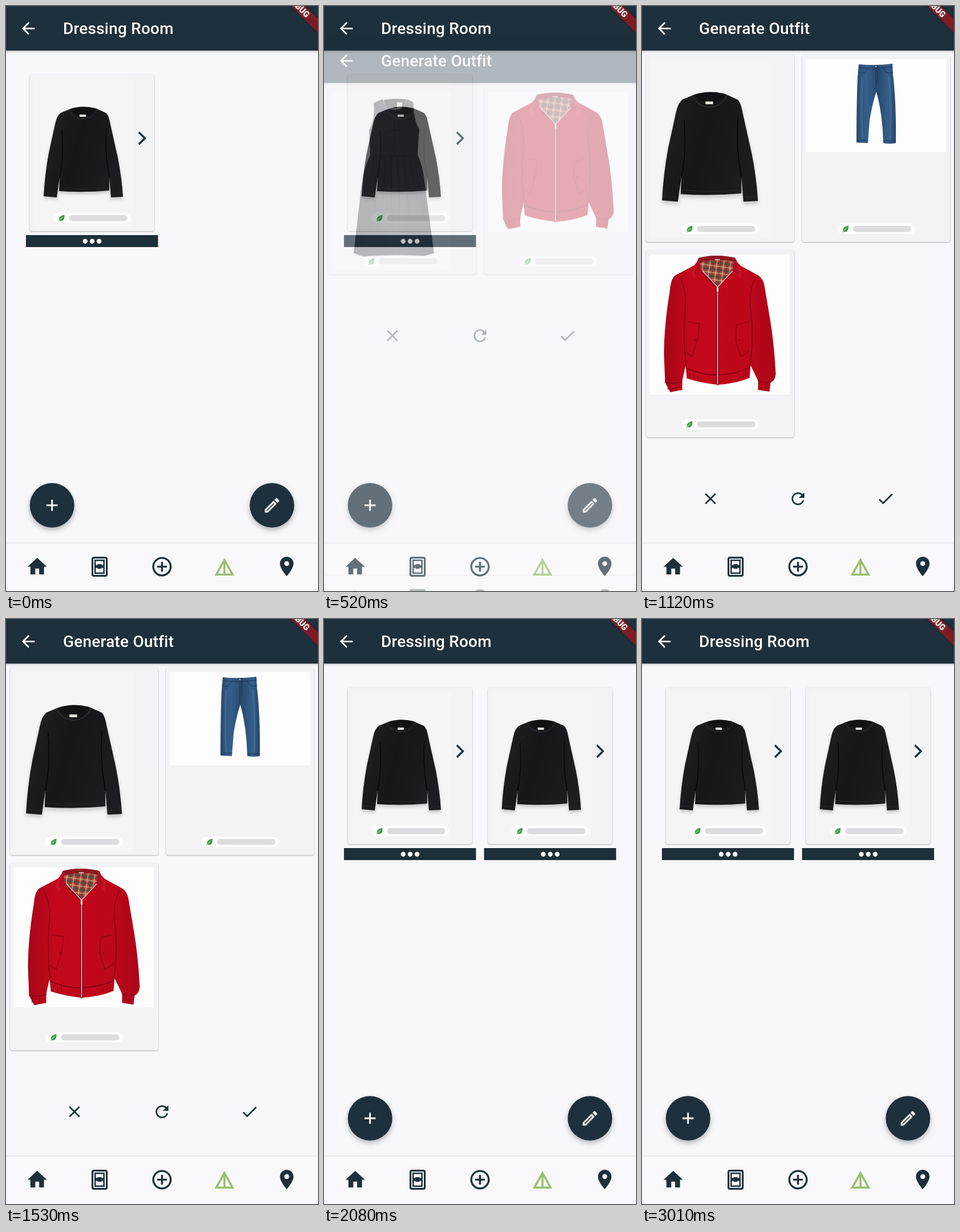
Recreate the animation shown at these times as an HTML page. Size 547x1024 px, loop 3.03 s.

```html
<!DOCTYPE html>
<html lang="en">
<head>
<meta charset="utf-8">
<title>Dressing Room</title>
<style>
html, body { margin: 0; width: 100%; height: 100%; overflow: hidden; background: #f8f8fc; }
svg.stage { display: block; width: 100vw; height: 100vh; }
text { font-family: Roboto, sans-serif; }
.title { font-size: 28px; font-weight: 500; letter-spacing: .2px; fill: #fff; }
.ink { fill: #1d303a; }
.card { fill: #f3f3f5; filter: drop-shadow(0 1px 1.2px rgba(0,0,0,.3)); }
.photo { fill: #fdfdfd; }
.fab { fill: #1e303b; filter: drop-shadow(0 4px 5px rgba(20,30,40,.33)); }
.bar { fill: #1e303b; filter: drop-shadow(0 1.5px 2px rgba(0,0,0,.3)); }
.line { fill: none; stroke-linecap: round; stroke-linejoin: round; }

.page, .fade, .before, .after, .added, .ripple { animation: 3030ms linear infinite both; }
.page { animation-name: rise; }
.fade { animation-name: fade; }
.before, .after, .added { animation-timing-function: step-end; }
.before { animation-name: before; }
.after { animation-name: after; }
.added { animation-name: added; }
.ripple { transform-box: fill-box; transform-origin: center; }
.edit { animation-name: edit; }
.redo { animation-name: redo; }
.accept { animation-name: accept; }

/* Page pushed in from below, later popped with the curves mirrored */
@keyframes rise {
  0%, 15.18% { transform: translateY(265px); animation-timing-function: cubic-bezier(.4,0,.2,1); }
  19.14%, 63.7% { transform: translateY(0); animation-timing-function: cubic-bezier(.8,0,.6,1); }
  67.66%, 100% { transform: translateY(265px); }
}
@keyframes fade {
  0%, 15.18% { opacity: 0; animation-timing-function: cubic-bezier(.42,0,1,1); }
  19.14%, 63.7% { opacity: 1; animation-timing-function: cubic-bezier(0,0,.58,1); }
  67.66%, 100% { opacity: 0; }
}
@keyframes before { 0% { opacity: 1; } 33%, 100% { opacity: 0; } }
@keyframes after { 0% { opacity: 0; } 33%, 100% { opacity: 1; } }
@keyframes added { 0% { opacity: 0; } 60%, 100% { opacity: 1; } }
@keyframes edit {
  0%, 13.2% { opacity: 0; transform: scale(.3); }
  13.8% { opacity: .1; }
  15.5%, 17.5% { opacity: .1; transform: scale(1); }
  19.2%, 100% { opacity: 0; transform: scale(1); }
}
@keyframes redo {
  0%, 29.6% { opacity: 0; transform: scale(.3); }
  30% { opacity: .065; }
  31.6% { opacity: .065; transform: scale(1); }
  33%, 100% { opacity: 0; transform: scale(1); }
}
@keyframes accept {
  0%, 60% { opacity: 0; transform: scale(.3); }
  60.5% { opacity: .065; }
  62%, 63% { opacity: .065; transform: scale(1); }
  65%, 100% { opacity: 0; transform: scale(1); }
}
</style>
</head>
<body>
<svg class="stage" viewBox="0 0 547 1024" preserveAspectRatio="none">
<defs>
  <linearGradient id="knit" x1="0" x2="1" y1="0" y2=".3">
    <stop offset="0" stop-color="#222224"/><stop offset=".5" stop-color="#161618"/><stop offset="1" stop-color="#1d1d1f"/>
  </linearGradient>
  <linearGradient id="denim" x1="0" x2="1">
    <stop offset="0" stop-color="#294a70"/><stop offset=".25" stop-color="#355f8c"/>
    <stop offset=".55" stop-color="#284a6f"/><stop offset=".8" stop-color="#345e8a"/><stop offset="1" stop-color="#28486c"/>
  </linearGradient>
  <linearGradient id="red" x1="0" x2="1">
    <stop offset="0" stop-color="#a80618"/><stop offset=".25" stop-color="#c4081c"/>
    <stop offset=".75" stop-color="#bd071b"/><stop offset="1" stop-color="#ab0618"/>
  </linearGradient>
  <linearGradient id="cloth" x1="0" x2="1">
    <stop offset="0" stop-color="#2b2c36"/><stop offset=".5" stop-color="#363742"/><stop offset="1" stop-color="#2a2b34"/>
  </linearGradient>
  <pattern id="tartan" width="12" height="12" patternUnits="userSpaceOnUse" patternTransform="rotate(8)">
    <path fill="#b4453c" d="M0 0h12v12H0z"/>
    <path fill="#2f4238" opacity=".6" d="M0 0h4v12H0zM0 0h12v4H0z"/>
    <path stroke="#e8d9a0" stroke-width=".9" d="M8 0v12M0 8h12"/>
  </pattern>
  <filter id="soft" x="-20%" y="-20%" width="140%" height="140%"><feGaussianBlur stdDeviation="2.5"/></filter>

  <path id="sweaterShape" d="M113 180Q134 191 157 179L175 187Q180 190 183 207L196 265Q203 300 205 334L184 335L181 300V323Q138 327 93 324L94 300L89 335L66 333Q68 295 75 257L86 207Q89 192 96 187Z"/>
  <g id="sweater">
    <use href="#sweaterShape" y="4" fill="#777" opacity=".35" filter="url(#soft)"/>
    <use href="#sweaterShape" fill="url(#knit)"/>
    <path d="M113 180Q134 173 157 179Q153 191 135 191Q118 191 113 180" fill="#111113"/>
    <path d="M110 182Q118 198 136 198Q153 197 160 181" class="line" stroke="#34343a"/>
    <path d="M129 190h11v4h-11z" fill="#e6e4de"/>
    <path d="M98 217Q102 262 94 300M176 214Q173 260 181 300" class="line" stroke="#060607" stroke-width="1.3"/>
    <path d="M94 318Q138 322 181 318M67 327l22 2M184 329l20-1" class="line" stroke="#2c2c30" stroke-width=".8"/>
  </g>

  <g id="dress">
    <path d="M104 108Q123 104 144 107L141 122H108Z" fill="#22232b"/>
    <path d="M128 112h9v10h-9z" fill="#e9e6da"/>
    <path fill="url(#cloth)" d="M103 106Q106 124 124 125Q142 124 145 106L157 112Q157 142 167 159L164 204Q173 222 176 249L193 376Q182 379 176 381Q120 378 69 382L52 376L66 256Q71 223 81 205L79 160Q90 142 87 113Z"/>
    <path d="M103 107Q106 125 124 126Q142 125 145 107M88 114Q90 143 80 159M156 113Q157 142 166 159" class="line" stroke="#b9b9c0" stroke-dasharray="1 3"/>
    <path d="M54 377Q62 381 70 382Q124 378 176 381L192 377" class="line" stroke="#b0b0b8" stroke-dasharray="2 3"/>
    <path d="M81 205Q122 208 164 204M105 165Q122 156 141 163M123 127V202M63 359Q122 366 185 359" class="line" stroke="#23242c"/>
    <path d="M88 207L73 290M97 207L88 310M107 208L104 280M117 208L119 330M128 208L133 290M139 207L151 320M149 207L165 290M158 206L176 310" class="line" stroke="#24252e" stroke-width="1.2"/>
  </g>

  <g id="jacket">
    <path d="M373 99Q404 91 437 99L432 124L407 149L376 121Z" fill="url(#tartan)"/>
    <path d="M373 99Q404 91 437 99L435 106Q405 99 375 107Z" fill="#8e1420"/>
    <path d="M401 102h9" stroke="#ddd" stroke-width="1.5"/>
    <path fill="url(#red)" d="M372 103L365 112L331 130Q324 136 322 158Q312 220 312 268L314 317L323 334L344 330V314L350 287L352 310Q378 318 406 321Q438 319 462 309L464 287L477 314V330L497 333L499 317Q507 314 508 302Q505 245 497 200L488 147Q486 136 478 130L447 113L437 103L432 121L407 148L377 121Z"/>
    <path fill="#c9102a" d="M373 99L377 119L364 138L360 126ZM437 99L432 118L447 136L448 121Z"/>
    <path fill="#b00c20" d="M373 99L365 128L380 127L405 148L376 118ZM437 99L445 128L430 125L408 148L433 118Z"/>
    <path d="M350 180Q345 240 351 292Q378 304 406 304Q438 302 462 291Q471 240 463 180M314 316q14 5 30-1M477 314q11 5 22 2" class="line" stroke="#7a0413" stroke-width="1.4"/>
    <path d="M355 211L374 214L371 241L361 272L350 264M458 211L439 216L438 244L447 272L461 262M340 133Q353 160 349 190M472 133Q460 160 464 190" class="line" stroke="#850516" stroke-width="1.2"/>
    <path d="M357 298v12M364 301v11M371 303v11M443 303v11M450 301v11M456 298v12M319 321v9M326 321v11M333 320v11M483 318v12M490 319v12" stroke="#8c0617" stroke-width="1"/>
    <path d="M385 130L406 150V320" class="line" stroke="#7c0716" stroke-width="4"/>
    <path d="M380 122L406 150V320M432 122L406 150" class="line" stroke="#d9c9c9" stroke-width="1.5"/>
    <path d="M406 149v9" stroke="#f1efef" stroke-width="3"/>
    <circle cx="368" cy="243" r="1.6" fill="#7c0716"/><circle cx="444" cy="243" r="1.6" fill="#7c0716"/>
  </g>

  <g id="jeans">
    <path fill="url(#denim)" d="M380 102Q409 105 439 101L440 120Q446 170 445 240Q434 242 423 240Q422 190 411 150Q405 165 399 200L396 240L376 239Q376 170 378 125Z"/>
    <path d="M380 108Q409 111 439 107M410 105V150M379 116Q390 122 396 109M440 116Q428 121 423 109M413 109v22l-3 5M377 235h19M424 236h21" class="line" stroke="#1c3656"/>
    <path d="M386 125Q383 180 386 233M433 125Q438 180 435 233" class="line" stroke="#5f8ab0" stroke-width="3" opacity=".35"/>
    <circle cx="410" cy="106" r="1.2" fill="#c8b48c"/>
  </g>

  <g id="rating">
    <rect width="136" height="18" rx="9" fill="#fff"/>
    <rect x="27.5" y="4" width="102" height="10.5" rx="5" fill="#dcdcde"/>
    <path d="M19.500 3.500Q20.500 14.500 13 14.500Q12 14.500 11 14L9.500 15.500L8.700 14.700L10 13Q8 6 19.500 3.500Z" fill="#43a047"/>
    <path d="M10 14.500Q12 10 16 8" class="line" stroke="#dff0df" stroke-width=".8"/>
  </g>

  <g id="tile">
    <rect class="card" x="41.500" y="119.500" width="218.500" height="274.500" rx="4.500"/>
    <path d="M48 127h175v261H48z" fill="#f5f5f6"/>
    <use href="#sweater"/>
    <path d="M233 221l10.500 10.500L233 242" fill="none" stroke="#1d303a" stroke-width="3.400"/>
    <use href="#rating" x="83" y="362"/>
    <path class="ink" d="M35 401h231.500v21H35z"/>
    <g fill="#fff"><circle cx="138.800" cy="411.800" r="4.200"/><circle cx="151" cy="411.800" r="4.200"/><circle cx="163.200" cy="411.800" r="4.200"/></g>
  </g>

  <g id="slot">
    <rect class="card" x="7" y="85" width="260" height="328" rx="4.500"/>
  </g>

  <g id="actions" class="ink">
    <path transform="translate(103.200 -16.800) scale(1.4)" d="M19 6.410L17.590 5 12 10.590 6.410 5 5 6.410 10.590 12 5 17.590 6.410 19 12 13.410 17.590 19 19 17.590 13.410 12z"/>
    <path transform="translate(256.700 -16.800) scale(1.4)" d="M17.650 6.350A7.958 7.958 0 0 0 12 4c-4.420 0-7.990 3.580-7.990 8s3.570 8 7.990 8c3.730 0 6.840-2.550 7.730-6h-2.080A5.990 5.990 0 0 1 12 18c-3.310 0-6-2.690-6-6s2.690-6 6-6c1.660 0 3.140.69 4.220 1.780L13 11h7V4z"/>
    <path transform="translate(410.200 -16.800) scale(1.4)" d="M9 16.170L4.830 12l-1.420 1.410L9 19 21 7l-1.410-1.410z"/>
  </g>

  <g id="top">
    <path class="bar" d="M-4-4h555v82H-4z"/>
    <path fill="#fff" transform="translate(22.300 22.500) scale(1.4)" d="M20 11H7.830l5.590-5.590L12 4l-8 8 8 8 1.410-1.410L7.830 13H20v-2z"/>
  </g>

  <g id="nav">
    <path d="M0 940h547v84H0z" fill="#f9f9fd"/>
    <path d="M0 940h547" stroke="#ededf1" stroke-width="2.500"/>
    <path class="ink" transform="translate(34.300 961) scale(1.7)" d="M10 20v-6h4v6h5v-8h3L12 3 2 12h3v8z"/>
    <rect x="151.600" y="965.600" width="25" height="31.800" rx="2.500" fill="none" stroke="#1d303a" stroke-width="3.200"/>
    <path class="ink" fill-rule="evenodd" d="M155 969h18v25h-18zM157.500 971.500v7h3v-1.500h7v1.500h3v-7zM157.500 983.500v8h13v-8h-3v1.500h-7v-1.500z"/>
    <path class="ink" transform="translate(253.100 961) scale(1.7)" d="M13 7h-2v4H7v2h4v4h2v-4h4v-2h-4V7zm-1-5C6.480 2 2 6.480 2 12s4.480 10 10 10 10-4.480 10-10S17.520 2 12 2zm0 18c-4.410 0-8-3.590-8-8s3.590-8 8-8 8 3.590 8 8-3.590 8-8 8z"/>
    <path d="M383 969.600L368.700 995.300H397.300ZM383 970v25" fill="none" stroke="#9abe6b" stroke-width="3.500"/>
    <path class="ink" transform="translate(471.800 960.700) scale(1.7)" d="M12 2C8.130 2 5 5.130 5 9c0 5.250 7 13 7 13s7-7.750 7-13c0-3.870-3.130-7-7-7zm0 9.500c-1.380 0-2.500-1.120-2.500-2.500s1.120-2.500 2.500-2.500 2.500 1.120 2.500 2.500-1.120 2.500-2.500 2.500z"/>
  </g>
</defs>

<!-- Dressing room -->
<path d="M0 0h547v1024H0z" fill="#f8f8fc"/>
<use href="#tile"/>
<g class="added"><use href="#tile" x="245.600"/></g>
<circle class="fab" cx="80.700" cy="874" r="39"/>
<path d="M70.900 874h19.600M80.700 864.200v19.600" stroke="#fff" stroke-width="2.800"/>
<circle class="fab" cx="466.300" cy="874" r="39"/>
<circle class="ripple edit" cx="466.300" cy="874" r="39" fill="#fff"/>
<path fill="#fff" transform="translate(449.500 857.200) scale(1.4)" d="M14.060 9.020l.92.92L5.920 19H5v-.92l9.060-9.060M17.660 3c-.25 0-.51.1-.7.29l-1.830 1.830 3.750 3.750 1.830-1.830c.39-.39.39-1.020 0-1.410l-2.340-2.340c-.2-.2-.45-.29-.71-.29zm-3.600 3.190L3 17.250V21h3.750L17.810 9.940l-3.750-3.750z"/>
<use href="#nav"/>
<use href="#top"/>
<text class="title" x="100" y="49">Dressing Room</text>

<!-- Generate outfit -->
<g class="page"><g class="fade">
  <path d="M0 0h547v1024H0z" fill="#f8f8fc"/>
  <g class="before">
    <use href="#slot"/><use href="#slot" x="273.500"/>
    <path d="M14 93h209v313H14z" fill="#f9f9fa"/>
    <use href="#dress"/><use href="#rating" x="69" y="381"/>
    <path class="photo" d="M287.500 93H533v245H287.500z"/>
    <use href="#jacket"/><use href="#rating" x="342.500" y="381"/>
    <circle class="ripple redo" cx="273.500" cy="520.500" r="48.500"/>
    <use href="#actions" y="520.500"/>
  </g>
  <g class="after">
    <use href="#slot"/><use href="#slot" x="273.500"/><use href="#slot" y="342"/>
    <path d="M14 93h209v313H14z" fill="#f5f5f6"/>
    <use href="#sweater" transform="translate(-44.800 -62.800) scale(1.21)"/>
    <use href="#rating" x="69" y="381"/>
    <path class="photo" d="M287.500 93H533v163H287.500z"/>
    <use href="#jeans"/><use href="#rating" x="342.500" y="381"/>
    <path class="photo" d="M14 435h245v245H14z"/>
    <use href="#jacket" x="-273.500" y="342"/><use href="#rating" x="69" y="723"/>
    <circle class="ripple accept" cx="427" cy="862.500" r="48.800"/>
    <use href="#actions" y="862.500"/>
  </g>
  <use href="#nav"/>
  <use href="#top"/>
  <text class="title" x="100" y="49">Generate Outfit</text>
</g></g>

<!-- Corner ribbon -->
<g transform="translate(513.500 1.500) rotate(45)">
  <path d="M-70-8.500H70v17H-70z" fill="#7e1c24" style="filter:drop-shadow(0 0 2px rgba(0,0,0,.4))"/>
  <text y="5" text-anchor="middle" font-size="14.300" font-weight="900" fill="#fff">DEBUG</text>
</g>
</svg>
</body>
</html>
```
